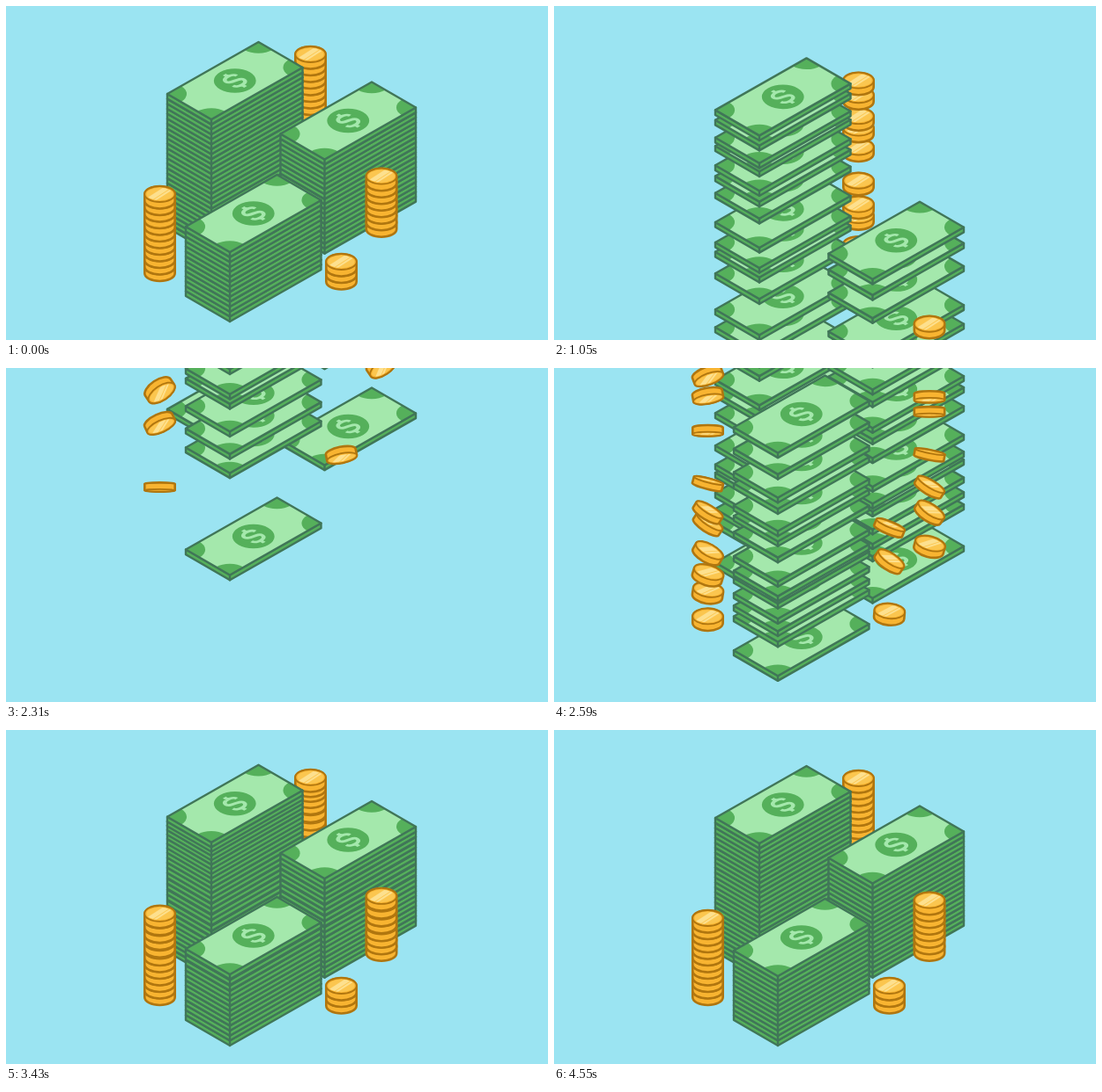
An HTML page with a canvas that plays this animation: 615 px wide and 380 px high, repeating every 4620 ms.

```html
<!DOCTYPE html>
<html lang="en">
<head>
<meta charset="utf-8">
<title>Stacks of cash and coins</title>
<style>
html, body { margin: 0; width: 100%; height: 100%; overflow: hidden; background: #9be4f2; }
canvas { display: block; }
</style>
</head>
<body>
<canvas id="stage" width="615" height="380"></canvas>
<script>
const ctx = document.getElementById('stage').getContext('2d');
const LOOP = 4620, STEP = 70;
const FALL = 600, DROP = 380, GRAVITY = 0.0028;
const HOP = 5.5, HOP_TIME = 480;
const BILL_H = 5.64, COIN_H = 7.5;
const LONG = 119, SHORT = 57.8;
const SKY = '#9be4f2', INK = '#407658', GREEN = '#55b05b', PALE = '#a4e8ac';
const RIM = '#b0760f', GOLD = '#f8b431', FACE = '#fbc64f', SHINE = '#fde08e';

// x, y: left corner of the top bill, or centre of the top coin.
// leave, arrive: [time of the lowest item, extra wait of the others, wait per item]
const stacks = [
  { draw: coin, h: COIN_H, x: 345.5, y: 55, n: 12, leave: [760, 0, 17], arrive: [2140, 0, 60] },
  { draw: bill, h: BILL_H, x: 183, y: 100, n: 27, leave: [566, 0, 15.5], arrive: [2145, 62, 22.6] },
  { draw: bill, h: BILL_H, x: 311.5, y: 145.5, n: 19, leave: [545, 0, 15.8], arrive: [2106, 85, 21] },
  { draw: bill, h: BILL_H, x: 204, y: 251, n: 14, leave: [492, 0, 18], arrive: [2044, 103, 20] },
  { draw: coin, h: COIN_H, x: 174.5, y: 214, n: 12, leave: [560, 0, 20], arrive: [2105, 20, 37] },
  { draw: coin, h: COIN_H, x: 426, y: 193.7, n: 8, leave: [604, 61, 20], arrive: [2200, 0, 44] },
  { draw: coin, h: COIN_H, x: 380.5, y: 291, n: 3, leave: [590, 55, 4], arrive: [2157, 0, 80] }
];

function startTime([first, gap, wait], i, n) {
  const jitter = i && i < n - 1 ? 0.4 * wait * Math.sin(i * i * 1.7) : 0;
  return first + (i ? gap : 0) + wait * i + jitter;
}

// Vertical distance of an item from its resting place
function offset(stack, i, t) {
  if (t < 1600) {
    const dt = Math.max(0, t - startTime(stack.leave, i, stack.n));
    return GRAVITY * dt * dt;
  }
  const dt = Math.max(0, t - startTime(stack.arrive, i, stack.n));
  if (dt < FALL) return -DROP * (1 - dt / FALL) ** 2;
  const hop = Math.min(1, (dt - FALL) / HOP_TIME);
  return -HOP * Math.sin(Math.PI * hop);
}

function polygon(points) {
  ctx.beginPath();
  points.forEach(([x, y]) => ctx.lineTo(x, y));
  ctx.closePath();
}

function paint(fill, stroke, width) {
  ctx.fillStyle = fill;
  ctx.fill();
  ctx.strokeStyle = stroke;
  ctx.lineWidth = width;
  ctx.stroke();
}

function bill(x, y) {
  ctx.save();
  ctx.translate(x, y);
  ctx.lineJoin = 'round';
  const left = [0, 0], back = [103.5, -59], right = [153.5, -30], front = [50, 29];
  const lower = ([px, py]) => [px, py + BILL_H];
  polygon([left, front, right, lower(right), lower(front), lower(left)]);
  paint(GREEN, INK, 2.4);
  polygon([front, lower(front)]);
  ctx.stroke();

  // Top face, drawn flat in the plane of the bill
  ctx.save();
  ctx.transform(103.5 / LONG, -59 / LONG, 50 / SHORT, 29 / SHORT, 0, 0);
  ctx.fillStyle = PALE;
  ctx.fillRect(0, 0, LONG, SHORT);
  ctx.fillStyle = GREEN;
  [[0, 0], [LONG, 0], [LONG, SHORT], [0, SHORT]].forEach(([cx, cy], k) => {
    ctx.beginPath();
    ctx.moveTo(cx, cy);
    ctx.arc(cx, cy, 18, k * Math.PI / 2, (k + 1) * Math.PI / 2);
    ctx.fill();
  });
  ctx.translate(LONG / 2, SHORT / 2);
  ctx.beginPath();
  ctx.arc(0, 0, 19.5, 0, 7);
  ctx.fill();
  ctx.strokeStyle = PALE;
  ctx.lineWidth = 3.8;
  ctx.beginPath();
  ctx.moveTo(7, -4.5);
  ctx.bezierCurveTo(6, -11, -7, -11, -7, -4.5);
  ctx.bezierCurveTo(-7, 1.5, 7, -1.5, 7, 4.5);
  ctx.bezierCurveTo(7, 11, -6, 11, -7, 4.5);
  ctx.moveTo(0, -14);
  ctx.lineTo(0, -8.5);
  ctx.moveTo(0, 8.5);
  ctx.lineTo(0, 14);
  ctx.stroke();
  ctx.restore();

  polygon([left, back, right, front]);
  ctx.strokeStyle = INK;
  ctx.lineWidth = 2.4;
  ctx.stroke();
  ctx.restore();
}

// Coins tumble while they are high above their place
function coin(x, y, height) {
  const turn = Math.cos(height / 95);
  const rx = 17.2, ry = 9 * Math.abs(turn), half = COIN_H / 2;
  ctx.save();
  ctx.translate(x, y + half);
  ctx.rotate(0.6 * Math.sin(height / 54) ** 3);
  ctx.beginPath();
  ctx.ellipse(0, -half, rx, ry, 0, Math.PI, 2 * Math.PI);
  ctx.ellipse(0, half, rx, ry, 0, 0, Math.PI);
  ctx.closePath();
  paint(GOLD, RIM, 2.6);

  ctx.translate(0, turn < 0 ? half : -half);
  ctx.beginPath();
  ctx.ellipse(0, 0, rx, ry, 0, 0, 7);
  paint(GOLD, RIM, 1.8);
  ctx.beginPath();
  ctx.ellipse(0, 0, rx - 2.2, Math.max(0, ry - 1.8), 0, 0, 7);
  ctx.fillStyle = FACE;
  ctx.fill();
  ctx.clip();
  ctx.strokeStyle = SHINE;
  [[-3, 5], [5, 2]].forEach(([shift, width]) => {
    ctx.lineWidth = width;
    ctx.beginPath();
    ctx.moveTo(shift - 14, 9);
    ctx.lineTo(shift + 14, -9);
    ctx.stroke();
  });
  ctx.restore();
}

function drawStack(stack, t) {
  let limit = Infinity;
  for (let i = 0; i < stack.n; i++) {
    const shift = offset(stack, i, t);
    const rest = stack.y + (stack.n - 1 - i) * stack.h;
    const y = Math.min(rest + shift, limit);
    limit = y - 2.8;
    const height = shift < -HOP ? -shift : 0;
    if (y > -60 && y < 450) stack.draw(stack.x, y, height);
  }
}

function frame(now) {
  const t = Math.floor(now % LOOP / STEP) * STEP;
  ctx.fillStyle = SKY;
  ctx.fillRect(0, 0, 615, 380);
  stacks.forEach(stack => drawStack(stack, t));
  requestAnimationFrame(() => frame(performance.now() - origin));
}

const origin = performance.now();
frame(0);
</script>
</body>
</html>
```
